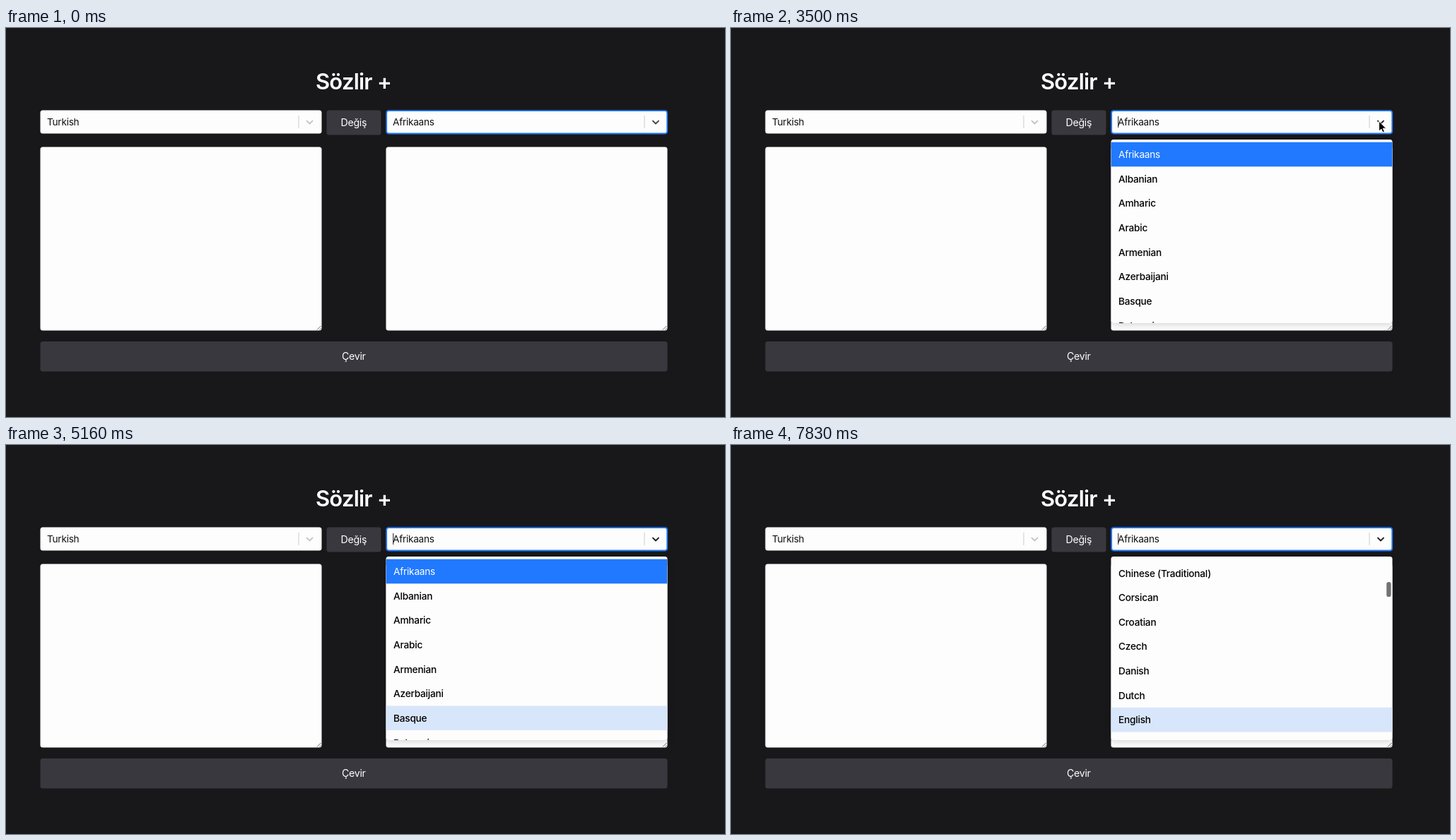
An HTML page that plays this animation: 1017x551 px, repeating every 8000 ms.

```html
<!DOCTYPE html>
<html lang="tr">
<head>
<meta charset="utf-8">
<title>Sözlir +</title>
<style>
  html, body { margin: 0; width: 100%; height: 100%; overflow: hidden; background: #18181b; }
  svg { display: block; width: 100%; height: 100%; }
  text { font: 400 13.7px Inter, "Open Sans", sans-serif; letter-spacing: -.021em; fill: #111; }
  #list text { font-weight: 450; letter-spacing: -.018em; fill: #000; }
  #list text:first-of-type { font-weight: 400; fill: #fff; }
  .light { font-size: 14.2px; fill: #fff; text-anchor: middle; }
  .title { font-size: 31px; font-weight: 600; letter-spacing: -.025em; }
  .button { fill: #39383e; }
  .paper { fill: #fdfdfd; }
  .arrow { fill: none; stroke-width: 1.9; stroke-linecap: round; stroke-linejoin: round; }
  .menu-box { filter: drop-shadow(0 0 .6px rgba(0,0,0,.45)) drop-shadow(0 3px 4px rgba(0,0,0,.14)); }
</style>
</head>
<body>
<svg viewBox="0 0 1017 551">
  <defs>
    <clipPath id="menuClip"><rect x="537.5" y="158" width="398" height="260" rx="3.5"/></clipPath>
    <path id="chevron" class="arrow" d="M-4 -1.9L0 2L4 -1.9"/>
    <g id="area">
      <rect class="paper" width="398" height="260" rx="3.5"/>
      <path d="M391.5 259L397 253.5M395 259L397 257" stroke="#555" stroke-width=".9"/>
    </g>
  </defs>

  <text class="light title" x="491.5" y="86.5">Sözlir +</text>

  <rect class="paper" x="48.5" y="116.5" width="398" height="33" rx="3.5"/>
  <text x="58" y="138">Turkish</text>
  <path d="M414 124v18" stroke="#ccc"/>
  <use href="#chevron" x="429.5" y="133.5" stroke="#c4c4c4"/>

  <rect class="button" x="453.5" y="116.5" width="77" height="35" rx="3.5"/>
  <text class="light" x="491.8" y="139">Değiş</text>

  <rect class="paper" x="538.2" y="117.2" width="397" height="32.3" rx="3.2" stroke="#2079ff" stroke-width="1.8"/>
  <text x="547" y="138">Afrikaans</text>
  <path d="M903 124v18" stroke="#ccc"/>
  <use id="toggle" href="#chevron" x="919" y="133.5"/>
  <path id="caret" d="M547.8 125v16" stroke="#111"/>

  <use href="#area" x="48.5" y="168.5"/>
  <use href="#area" x="537.5" y="168.5"/>
  <rect class="button" x="48.5" y="444" width="887" height="42.5" rx="3.5"/>
  <text class="light" x="491.8" y="469.8">Çevir</text>

  <g id="menu">
    <rect class="paper menu-box" x="537.5" y="158" width="398" height="260" rx="3.5"/>
    <g clip-path="url(#menuClip)">
      <g id="list"></g>
      <rect id="thumb" x="927.2" width="6.4" height="21" rx="3.2" fill="#737375"/>
    </g>
  </g>
  <path id="cursor" d="M0 0V14.2L3.3 11.1L5.4 16L7.9 14.9L5.8 10.2H10.2Z" fill="#000" stroke="#fff" stroke-width="1" stroke-linejoin="round"/>
</svg>
<script>
const LOOP = 8000, STEP = 1000 / 6;
const OPEN = 17, KEYS = 29;
const ROW = 34.62, TOP = 161.7, MENU_BOTTOM = 418;
const languages = ['Afrikaans', 'Albanian', 'Amharic', 'Arabic', 'Armenian', 'Azerbaijani',
  'Basque', 'Belarusian', 'Bengali', 'Bosnian', 'Bulgarian', 'Catalan', 'Cebuano', 'Chichewa',
  'Chinese (Simplified)', 'Chinese (Traditional)', 'Corsican', 'Croatian', 'Czech', 'Danish',
  'Dutch', 'English', 'Esperanto'];

// Key points: [step, ...values], joined by straight lines.
const pointerPath = [[3, 770, 432], [9, 866, 156], [10, 866, 156], [13, 922, 131],
  [20, 922, 131], [21, 916.5, 132], [26, 888, 212]];
const keyPresses = [[KEYS, 2], [31, 6], [37, 13], [44, 20], [47, 21]];

const $ = id => document.getElementById(id);
const [list, menu, thumb, caret, toggle, cursor] =
  ['list', 'menu', 'thumb', 'caret', 'toggle', 'cursor'].map($);
const show = (el, on) => el.setAttribute('visibility', on ? 'visible' : 'hidden');

function along(points, step) {
  const next = points.findIndex(p => p[0] > step);
  if (next < 0) return points.at(-1).slice(1);
  const a = points[Math.max(0, next - 1)], b = points[next];
  const k = Math.max(0, (step - a[0]) / (b[0] - a[0]));
  return a.slice(1).map((v, i) => v + (b[i + 1] - v) * k);
}

function add(tag, attrs, text = '') {
  const el = document.createElementNS('http://www.w3.org/2000/svg', tag);
  for (const name in attrs) el.setAttribute(name, attrs[name]);
  el.textContent = text;
  return list.appendChild(el);
}

const rows = languages.map((name, i) => {
  const y = TOP + i * ROW;
  const box = add('rect', { x: 537.5, y, width: 398, height: ROW });
  add('text', { x: 548, y: y + 22.5 }, name);
  return box;
});

function draw(step) {
  const open = step >= OPEN;
  const tip = along(pointerPath, step);
  const hovered = open && tip[1] > TOP + ROW ? 1 : 0;
  const focus = step < KEYS ? hovered : Math.floor(along(keyPresses, step)[0] + 1e-6);
  // Keep the focused row in view with a third of a row to spare.
  const scroll = Math.max(0, TOP + (focus + 4 / 3) * ROW - MENU_BOTTOM);
  const blink = ((step + 4.4) % 5.7) < 2.85;

  show(menu, open);
  show(thumb, scroll > 0);
  show(caret, open && blink);
  show(cursor, step >= pointerPath[0][0] && step < KEYS);
  toggle.setAttribute('stroke', open ? '#1c1c1c' : '#444');
  list.setAttribute('transform', `translate(0 ${-scroll})`);
  thumb.setAttribute('y', 160.5 + scroll * .065);
  cursor.setAttribute('transform', `translate(${tip})`);
  rows.forEach((row, i) => row.setAttribute('fill',
    i === 0 ? '#2079ff' : i === focus ? '#d8e6fb' : 'none'));
}

const start = performance.now();
function tick() {
  const time = (performance.now() - start) % LOOP;
  draw(Math.floor((time + 8) / STEP));
  requestAnimationFrame(tick);
}
tick();
</script>
</body>
</html>
```
